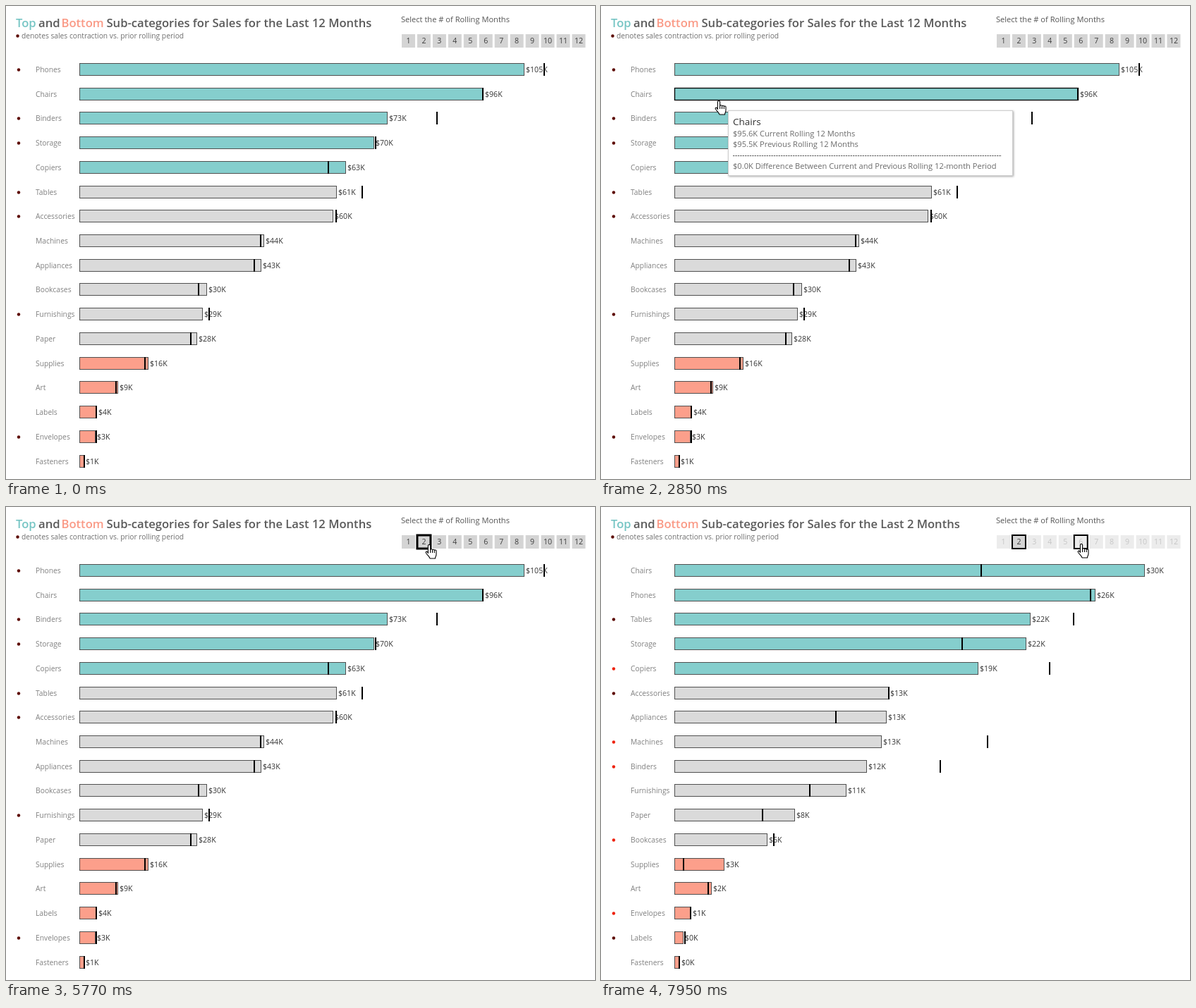
An HTML page that plays this animation: 835 by 671 pixels, repeating every 8 s.

```html
<!DOCTYPE html>
<html lang="en">
<head>
<meta charset="utf-8">
<title>Rolling sales by sub-category</title>
<style>
  html, body { margin: 0; width: 100%; height: 100%; overflow: hidden; background: #fff; }
  svg { display: block; width: 100%; height: 100%; font-family: "Open Sans", "Noto Sans", sans-serif; }
  .title { font-size: 16.6px; font-weight: 600; fill: #5a5a5a; }
  .note { font-size: 10.25px; fill: #707070; }
  .pick { font-size: 11.1px; fill: #555; }
  .cell { font-size: 10.6px; text-anchor: middle; }
  .name { font-size: 10.3px; fill: #808080; }
  .value { font-size: 10.6px; fill: #333; }
  .tip { font-size: 11.1px; fill: #6a6a6a; }
  .tip .head { font-size: 13.5px; fill: #333; }
  .box { fill: #fff; stroke: #cfcfcf; filter: drop-shadow(1px 1px 1.5px rgba(0, 0, 0, .35)); }
</style>
</head>
<body>
<svg id="stage" viewBox="0 0 835 671"></svg>
<script>
const LOOP = 8000, CLICK = 5770, SORT = 5930, SORTED = 6290;
const X0 = 104.5, ROW = 34.72;
const SCALE = [5.974, 22.46];
const TEAL = [133, 206, 205], GREY = [218, 218, 218], SALMON = [252, 159, 139];

// name, 12-month current and previous, 2-month current and previous (thousands)
const data = [
  ['Phones', 105.34, 110.06, 26.48, 26.22],
  ['Chairs', 95.57, 95.54, 29.59, 19.28],
  ['Binders', 72.8, 84.6, 12.07, 16.7],
  ['Storage', 69.7, 70.1, 22.15, 18.08],
  ['Copiers', 63, 58.8, 19.08, 23.6],
  ['Tables', 60.8, 66.8, 22.4, 25.13],
  ['Accessories', 60, 60.7, 13.45, 13.46],
  ['Machines', 43.6, 42.7, 13.02, 19.68],
  ['Appliances', 42.9, 41.3, 13.3, 10.11],
  ['Bookcases', 30, 28, 5.79, 6.21],
  ['Furnishings', 29, 30.5, 10.77, 8.46],
  ['Paper', 27.6, 26.2, 7.51, 5.5],
  ['Supplies', 16.1, 15.3, 3.05, 0.53],
  ['Art', 8.9, 8.4, 2.25, 2.05],
  ['Labels', 3.9, 3.85, 0.49, 0.62],
  ['Envelopes', 3.49, 3.7, 0.96, 0.97],
  ['Fasteners', 0.9, 0.85, 0.27, 0.24]
].map(([name, ...v], i) => ({ name, cur: [v[0], v[2]], prev: [v[1], v[3]], row: [i, 0] }));

const orders = [data, [...data].sort((a, b) => b.cur[1] - a.cur[1])];
orders[1].forEach((d, i) => { d.row[1] = i; });

// pointer stops: time, x, y
const path = [
  [540, 826, 650], [1280, 156, 89], [1410, 156, 89], [1510, 152, 85],
  [2540, 152, 85], [2850, 167, 135], [3360, 167, 135], [3590, 175, 184],
  [4490, 175, 184], [4720, 491, 89], [5260, 611, 56], [5360, 600, 54],
  [6720, 600, 54], [7260, 681, 53]
];

const clamp = u => Math.min(1, Math.max(0, u));
const ease = u => u * u * (3 - 2 * u);
const lerp = (a, b, u) => a + (b - a) * u;
const mix = (a, b, u) => `rgb(${a.map((c, i) => Math.round(lerp(c, b[i], u)))})`;
const grey = c => `rgb(${c},${c},${c})`;
const tint = row => row < 5 ? TEAL : row < 12 ? GREY : SALMON;
const rowY = row => Math.round(90 + ROW * row);
const money = k => `$${k.toFixed(1)}K`;

function set(node, attrs) {
  for (const key in attrs) node.setAttribute(key, attrs[key]);
}
function add(parent, tag, attrs, text) {
  const node = document.createElementNS('http://www.w3.org/2000/svg', tag);
  set(node, attrs);
  if (text !== undefined) node.textContent = text;
  return parent.appendChild(node);
}
function show(node, on) {
  node.style.display = on ? '' : 'none';
}

const stage = document.getElementById('stage');
const label = (cls, x, y, text, parent = stage) => add(parent, 'text', { class: cls, x, y }, text);

// heading
label('title', 14, 29.5, 'Top').style.fill = '#76c5c4';
label('title', 46, 29.5, 'and');
label('title', 78.5, 29.5, 'Bottom').style.fill = '#fa9a86';
const title = label('title', 142.5, 29.5, '');
add(stage, 'circle', { cx: 16.5, cy: 42.5, r: 2.2, fill: '#5c0800' });
label('note', 22, 46, 'denotes sales contraction vs. prior rolling period');
label('pick', 560, 23, 'Select the # of Rolling Months');

// month buttons
const cells = Array.from({ length: 12 }, (_, i) => {
  const cx = 570.5 + 21.95 * i;
  const box = { x: cx - 9.5, y: 40, width: 19, height: 19 };
  return {
    cx,
    bg: add(stage, 'rect', box),
    text: label('cell', cx, 53.4, i + 1),
    edge: add(stage, 'rect', { ...box, fill: 'none', stroke: '#000' })
  };
});

// row headers
const heads = data.map((_, i) => ({
  dot: add(stage, 'circle', { cx: 18, cy: rowY(i) + 0.5, r: 2.2 }),
  text: label('name', 42, rowY(i) + 4, '')
}));

// bars, values and reference lines in separate layers
const [bars, values, marks] = [0, 1, 2].map(() => add(stage, 'g', {}));
[...data].reverse().forEach(d => {
  d.bar = add(bars, 'rect', { x: X0, height: 17 });
  d.value = label('value', 0, 0, '', values);
  d.mark = add(marks, 'rect', { width: 2, height: 18 });
});

// tooltip
const tip = add(stage, 'g', { class: 'tip' });
add(tip, 'rect', { class: 'box', x: 0.5, y: 0.5, width: 403, height: 92 });
const tipHead = label('head', 7, 21, '', tip);
const tipCur = label('', 7, 37, '', tip);
const tipPrev = label('', 7, 52.3, '', tip);
add(tip, 'path', { d: 'M7 64.5H388', stroke: '#555', 'stroke-dasharray': '2.4 1' });
const tipDiff = label('', 7, 83, '', tip);

// pointers
const pen = { fill: '#fff', stroke: '#000', 'stroke-width': 1.1, 'stroke-linejoin': 'round' };
const hand = add(stage, 'g', pen);
add(hand, 'path', { d: 'M-1.6 11.5V1a1.6 1.6 0 0 1 3.2 0V7a1.4 1.4 0 0 1 2.9.4a1.4 1.4 0 0 1 2.8.6a1.3 1.3 0 0 1 2.7.8V13c0 3-1.5 3.5-1.5 6H1C.5 16.5-2 15-4.6 11.2c-1-1.6.8-2.8 2-1.4z' });
add(hand, 'path', { d: 'M1.6 7v4M4.5 8v3M7.3 8.5v2.5', fill: 'none' });
const arrow = add(stage, 'path', { ...pen, d: 'M0 0V16L3.7 12.6L6.2 18.5L8.6 17.4L6.1 11.7H11.2Z' });

function pointerAt(t) {
  if (t < path[0][0]) return null;
  const i = path.findIndex(p => p[0] > t);
  if (i < 0) return path[path.length - 1].slice(1);
  const [a, b] = [path[i - 1], path[i]];
  const u = ease((t - a[0]) / (b[0] - a[0]));
  return [lerp(a[1], b[1], u), lerp(a[2], b[2], u)];
}

function drawHeads(state) {
  title.textContent = `Sub-categories for Sales for the Last ${state ? 2 : 12} Months`;
  heads.forEach((h, i) => {
    const d = orders[state][i];
    const fell = d.prev[state] > d.cur[state];
    const fresh = state && data[i].prev[0] <= data[i].cur[0];
    h.text.textContent = d.name;
    show(h.dot, fell);
    set(h.dot, { fill: fresh ? '#ee210d' : '#5c0800' });
  });
}

function drawBars(state, p, hot) {
  // whole pixels at rest, free positions on the move
  const snap = p > 0 && p < 1 ? v => v : Math.round;
  for (const d of data) {
    const size = key => lerp(d[key][0] * SCALE[0], d[key][1] * SCALE[1], p);
    const y = lerp(rowY(d.row[0]), rowY(d.row[1]), p);
    const width = snap(size('cur')) + 1;
    set(d.bar, {
      y: y - 8.5, width,
      fill: mix(tint(d.row[0]), tint(d.row[1]), p),
      stroke: d === hot ? '#000' : '#505050',
      'stroke-width': d === hot ? 1.3 : 1
    });
    set(d.value, { x: X0 + width + 2.5, y: y + 4 });
    d.value.textContent = `$${Math.round(d.cur[state])}K`;
    set(d.mark, { x: snap(X0 + size('prev')), y: y - 9 });
  }
  // the two leading values collide while they swap
  show(data[0].value, p < 0.2 || p > 0.8);
}

function drawCells(t, over) {
  const fade = clamp((t - CLICK) / 150);
  cells.forEach((c, i) => {
    const chosen = t >= CLICK && i === 1;
    const u = chosen ? 0 : fade;
    set(c.bg, { fill: grey(Math.round(lerp(212, 236, u))) });
    set(c.text, { fill: grey(Math.round(lerp(60, 198, u))) });
    const hover = c === over;
    const press = t >= 7950 ? 2 : t >= 7870 ? 1.75 : 1.5;
    set(c.edge, { 'stroke-width': chosen ? (hover ? 3 : 2) : press });
    show(c.edge, chosen || hover);
  });
}

function drawTip(d, x, y) {
  show(tip, d);
  if (!d) return;
  const diff = d.cur[0] - d.prev[0];
  const gap = money(Math.abs(diff));
  tipHead.textContent = d.name;
  tipCur.textContent = `${money(d.cur[0])} Current Rolling 12 Months`;
  tipPrev.textContent = `${money(d.prev[0])} Previous Rolling 12 Months`;
  tipDiff.textContent = `${diff < 0 ? `(${gap})` : gap} Difference Between Current and Previous Rolling 12-month Period`;
  set(tip, { transform: `translate(${x + 13} ${y + 13})` });
}

function draw(t) {
  const at = pointerAt(t);
  const [x, y] = at ? at.map(Math.round) : [-99, -99];
  const state = t >= SORT ? 1 : 0;
  const p = ease(clamp((t - SORT) / (SORTED - SORT)));
  const hot = t < CLICK && data.find((d, i) =>
    Math.abs(y - rowY(i)) < 11 && x >= X0 && x <= X0 + d.cur[0] * SCALE[0]);
  const over = y >= 39 && y <= 60 && cells.find(c => Math.abs(x - c.cx) < 10.5);

  drawHeads(state);
  drawBars(state, p, hot);
  drawCells(t, over);
  drawTip(hot, x, y);

  const link = Boolean(hot || over);
  show(hand, at && link);
  show(arrow, at && !link);
  for (const c of [hand, arrow]) set(c, { transform: `translate(${x} ${y})` });
}

const start = performance.now();
function tick() {
  draw((performance.now() - start) % LOOP);
  requestAnimationFrame(tick);
}
tick();
</script>
</body>
</html>
```
